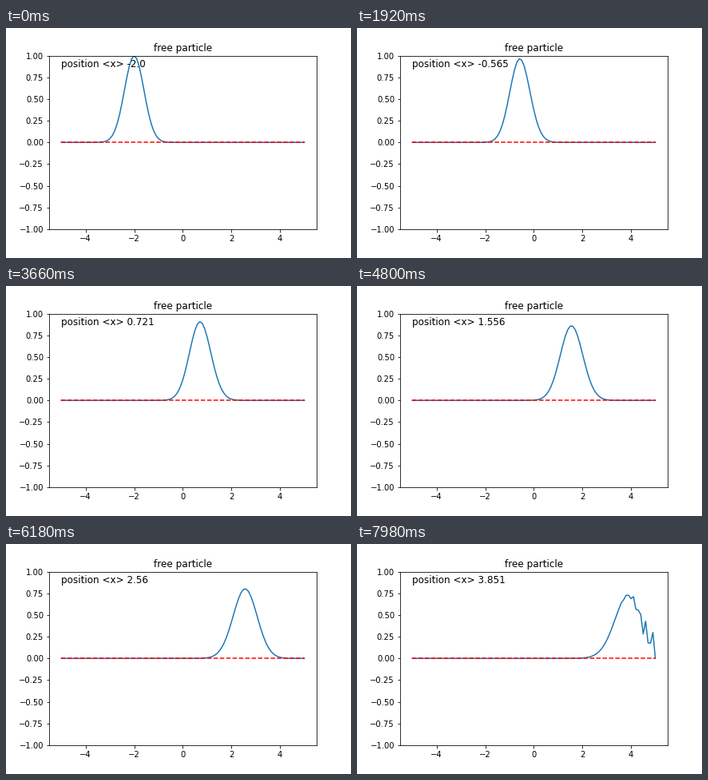
A matplotlib script that plays this animation: 432 px wide and 288 px high, repeating every 8 s.

```python
import numpy as np
import matplotlib.pyplot as plt
from matplotlib.animation import FuncAnimation

TICK_MS = 20          # animation interval
TICKS_PER_STEP = 3    # the wave advances every 60 ms
TICKS = 400

# Wave packet on a lattice between two hard walls
HALF = 5.0
CELLS = 100
DX = 2 * HALF / CELLS
X0, SIGMA, K0 = -2.0, 0.4, 11.43
DT = 0.0005
SUBSTEPS = 10

x = np.linspace(-HALF, HALF, CELLS + 1)
mode = np.arange(1, CELLS)
modes = np.sin(np.outer(x + HALF, mode) * np.pi / (2 * HALF))
energy = (1 - np.cos(mode * np.pi / CELLS)) / DX**2

start = np.exp(-(x - X0) ** 2 / (4 * SIGMA**2) + 1j * K0 * x)
weights = modes.T @ start
growth = 1 / (1 + 1j * energy * DT)   # one implicit Euler step per mode


def density(step):
    psi = modes @ (weights * growth ** (SUBSTEPS * step))
    prob = np.abs(psi) ** 2
    return prob / (prob.sum() * DX)


fig, ax = plt.subplots(figsize=(6, 4), dpi=72)
fig.subplots_adjust(left=0.125, right=0.9, bottom=0.125, top=0.88)
ax.set_title("free particle")
ax.set_xlim(-1.1 * HALF, 1.1 * HALF)
ax.set_ylim(-1, 1)
wave, = ax.plot(x, density(0))
ax.plot(x, 0 * x, "r--")
label = ax.text(-HALF, 0.87, "", fontsize=12)


def update(tick):
    prob = density(tick // TICKS_PER_STEP)
    mean = np.sum(x * prob) * DX
    wave.set_ydata(prob)
    label.set_text(f"position <x> {round(float(mean), 3)}")
    return wave, label


anim = FuncAnimation(fig, update, frames=TICKS, interval=TICK_MS,
                     repeat=True, repeat_delay=0, blit=False)
plt.show()
```
